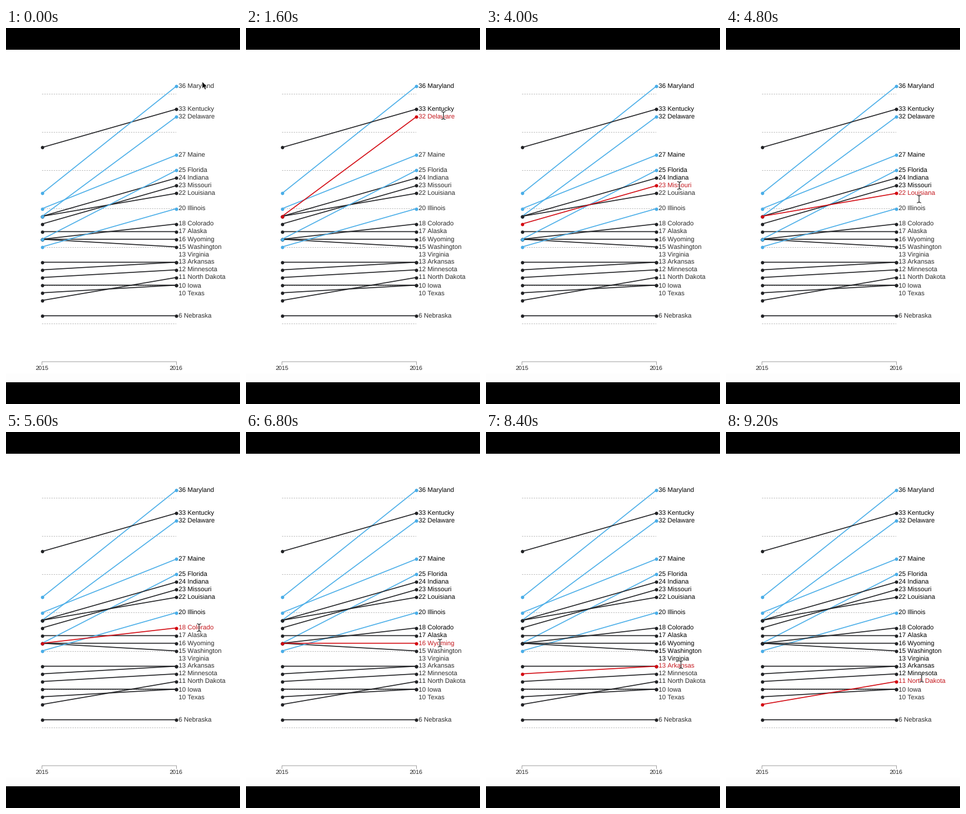
A matplotlib script for the animation above (9.6 s loop, 400x640 px).

```python
import numpy as np
import matplotlib.pyplot as plt
from matplotlib.animation import FuncAnimation
from matplotlib.patches import Polygon, Rectangle

W, H, DPI = 400, 640, 100
PT = 72 / DPI  # points per pixel
FRAMES, INTERVAL = 24, 400

plt.rcParams["font.family"] = "Liberation Sans"
plt.rcParams["text.hinting"] = "none"
plt.rcParams["text.hinting_factor"] = 1

INK, BLUE, RED = "#222326", "#4aaee8", "#d30a12"
LABEL_IDLE, LABEL_SEEN, LABEL_RED = "#2b2b2b", "#000000", "#c4161c"
X_LEFT, X_RIGHT = 61.7, 291
Y_ZERO, Y_STEP = 567.9, 13.02

# name, 2015 value, 2016 value
STATES = [
    ("Maryland", 22, 36), ("Kentucky", 28, 33), ("Delaware", 19, 32),
    ("Maine", 20, 27), ("Florida", 16, 25), ("Indiana", 19, 24),
    ("Missouri", 18, 23), ("Louisiana", 19, 22), ("Illinois", 15, 20),
    ("Colorado", 16, 18), ("Alaska", 17, 17), ("Wyoming", 16, 16),
    ("Washington", 16, 15), ("Virginia", 13, 13), ("Arkansas", 12, 13),
    ("Minnesota", 11, 12), ("North Dakota", 8, 11), ("Iowa", 10, 10),
    ("Texas", 9, 10), ("Nebraska", 6, 6),
]
BLUE_STATES = {"Maryland", "Delaware", "Maine", "Florida", "Illinois"}
LABEL_SLOT = {"Virginia": 1, "Texas": -1}  # moved off a shared value

# pointer stops: step, x, y
STOPS = np.array([(0, 336, 99), (4, 337.5, 149), (5, 334, 190),
                  (7, 327.3, 239), (10, 330.5, 268), (12, 330, 291),
                  (14, 330, 333), (18, 332, 368), (19, 332, 373),
                  (23, 334.5, 419)])


def value_y(value):
    return Y_ZERO - Y_STEP * value


def pointer(step):
    return [np.interp(step, STOPS[:, 0], STOPS[:, i]) for i in (1, 2)]


LABEL_Y = np.array([value_y(end + LABEL_SLOT.get(name, 0))
                    for name, _, end in STATES])


def hovered_row(step):
    """Row whose label is nearest to the pointer; none before it moves."""
    if step == 0:
        return -1
    return int(np.argmin(abs(LABEL_Y - pointer(step)[1])))


fig = plt.figure(figsize=(W / DPI, H / DPI), dpi=DPI, facecolor="black")
ax = fig.add_axes([0, 0, 1, 1])
ax.set_xlim(0, W)
ax.set_ylim(H, 0)
ax.axis("off")


def stroke(xs, ys, color, width=1.0, **kw):
    return ax.plot(xs, ys, color=color, lw=width * PT, snap=False, **kw)[0]


ax.add_patch(Rectangle((0, 37), W, 566, fc="white", lw=0, zorder=0))
ax.add_patch(Rectangle((0, 588), W, 15, fc="#fdfdfd", lw=0, zorder=0))

for value in range(5, 40, 5):
    y = np.floor(value_y(value) + 0.4) + 0.5
    stroke([X_LEFT, X_RIGHT], [y, y], "#b4b4b4", dashes=(2, 2), zorder=1)

stroke([61.5, 61.5, 291.5, 291.5], [573, 568, 568, 573], "#a0a0a0", zorder=1)
for x, year in ((X_LEFT, "2015"), (X_RIGHT, "2016")):
    ax.text(x, 582.7, year, size=10.1 * PT, color="#222222",
            ha="center", va="baseline")

slopes, labels = [], []
for (name, start, end), y in zip(STATES, LABEL_Y):
    slopes.append(stroke([X_LEFT, X_RIGHT], [value_y(start), value_y(end)],
                         INK, 1.6, marker="o", ms=5.8 * PT, mew=0))
    labels.append(ax.text(295, y + 3.7, f"{end} {name}", size=10.6 * PT,
                          va="baseline", zorder=100))

arrow_shape = np.array([(0, 0), (0, 12.2), (2.8, 9.6), (4.7, 14), (6.7, 13.1),
                        (4.9, 8.9), (8.7, 8.9)])
ax_arrow = ax.add_patch(Polygon(arrow_shape + (335.3, 91), fc="black",
                                ec="white", lw=0.7 * PT, zorder=120))

# text pointer: a curved cap at each end of a stem
cap_x = np.linspace(-3, 3, 13)
cap_y = 5.2 + 1.3 * np.sqrt(abs(cap_x) / 3)
beam_x = np.concatenate([cap_x, [np.nan, 0, 0, np.nan], cap_x])
beam_y = np.concatenate([-cap_y, [np.nan, -5.2, 5.2, np.nan], cap_y])
beam = [stroke([], [], "white", 2.4, zorder=118),
        stroke([], [], "#1c1c1c", 1.1, zorder=119)]


def update(step):
    current = hovered_row(step)
    for row, (name, _, _) in enumerate(STATES):
        color = BLUE if name in BLUE_STATES else INK
        text_color = LABEL_SEEN if row < current else LABEL_IDLE
        if row == current:
            color, text_color = RED, LABEL_RED
        # a hovered line is raised and stays above those not yet visited
        slopes[row].set_zorder(50 + row if row <= current else 40 - row)
        slopes[row].set_color(color)
        labels[row].set_color(text_color)

    x, y = pointer(step)
    ax_arrow.set_visible(current < 0)
    for line in beam:
        line.set_visible(current >= 0)
        line.set_data(beam_x + x, beam_y + y)
    return [*slopes, *labels, ax_arrow, *beam]


anim = FuncAnimation(fig, update, frames=FRAMES, interval=INTERVAL,
                     init_func=lambda: update(0), repeat=True,
                     repeat_delay=0, blit=False)
plt.show()
```
